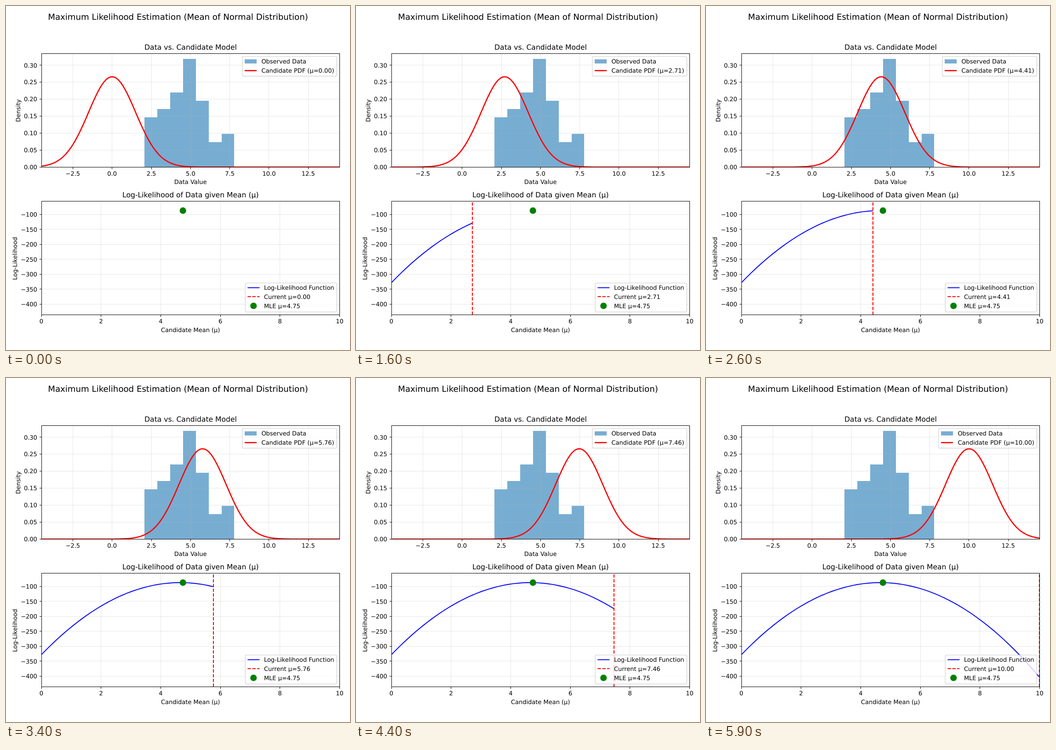
Recreate the animation shown at these times as an HTML page. Size 748 px wide and 748 px high, loop 6 s.

```html
<!DOCTYPE html>
<html lang="en">
<head>
<meta charset="utf-8">
<title>Maximum Likelihood Estimation</title>
<style>
  html, body { margin: 0; width: 100%; height: 100%; overflow: hidden; background: #fff; }
  svg { display: block; width: 100%; height: 100%; }
  text { font: 12.99px "DejaVu Sans", sans-serif; text-rendering: geometricPrecision; white-space: pre; }
  .mid { text-anchor: middle; }
  .end { text-anchor: end; }
  .title { font-size: 15.58px; }
  .head { font-size: 18.18px; }
  .bar { fill: #1f77b4; fill-opacity: .6; }
  .grid { stroke: #b0b0b0; stroke-opacity: .3; }
  .axis { stroke: #000; fill: none; }
  .pdf { stroke: #f00; stroke-width: 2.6; fill: none; stroke-linejoin: round; }
  .loglik { stroke: #00f; stroke-width: 1.95; fill: none; stroke-linejoin: round; }
  .current { stroke: #f00; stroke-width: 1.95; stroke-dasharray: 7.2 3.12; }
  .mle { fill: #008000; }
  .box { fill: #fff; fill-opacity: .8; stroke: #ccc; stroke-opacity: .8; stroke-width: 1.3; }
</style>
</head>
<body>
<svg id="stage" viewBox="0 0 748 748"></svg>
<script>
const STEPS = 60, STEP_MS = 100, SIGMA = 1.5, SAMPLES = 50;
const SAMPLE_MEAN = 4.658, PEAK = -87.2;
const LEFT = 77.5, RIGHT = 725.5;
const stage = document.getElementById('stage');

function add(tag, attrs, parent = stage) {
  const el = document.createElementNS('http://www.w3.org/2000/svg', tag);
  for (const key in attrs) el.setAttribute(key, attrs[key]);
  parent.appendChild(el);
  return el;
}
function label(str, x, y, cls = '', parent = stage) {
  const el = add('text', { x, y, class: cls }, parent);
  el.textContent = str;
  return el;
}
function line(x1, y1, x2, y2, cls, parent) {
  return add('line', { x1, y1, x2, y2, class: cls }, parent);
}
const minus = str => str.replace('-', '\u2212');
const snap = v => Math.floor(v) + .5;
const path = pts => 'M' + pts.map(p => p[0].toFixed(2) + ' ' + p[1].toFixed(2)).join('L');

const dataX = v => 77.1 + (v + 4.5) * 34.13;
const densY = v => 350.4 - v * 739;
const meanX = v => 77 + v * 64.84;
const likeY = v => 453.2 - (v + 100) * .65;
const meanAt = i => 10 * i / (STEPS - 1);
const logLik = m => PEAK - SAMPLES / (2 * SIGMA ** 2) * (m - SAMPLE_MEAN) ** 2;
const density = (x, m) => Math.exp(-(((x - m) / SIGMA) ** 2) / 2) / (SIGMA * Math.sqrt(2 * Math.PI));

// Grid, ticks and tick labels; returns a clipped layer for the curves.
function plot(id, top, bottom, xTicks, yTicks, mapX, mapY, digits) {
  const clip = add('clipPath', { id });
  add('rect', { x: 77, y: top, width: 649, height: bottom - top }, clip);
  for (const v of xTicks) {
    const x = snap(mapX(v));
    line(x, top, x, bottom, 'grid');
    line(x, bottom, x, bottom + 4.5, 'axis');
    label(minus(v.toFixed(digits[0])), mapX(v), bottom + 18.9, 'mid');
  }
  for (const v of yTicks) {
    const y = snap(mapY(v));
    line(LEFT, y, RIGHT, y, 'grid');
    line(LEFT - 4.5, y, LEFT, y, 'axis');
    label(minus(v.toFixed(digits[1])), 67.9, mapY(v) + 4.8, 'end');
  }
  const layer = add('g', { 'clip-path': `url(#${id})` });
  add('rect', { x: LEFT, y: top, width: RIGHT - LEFT, height: bottom - top, class: 'axis' });
  return layer;
}
const range = (n, from, step) => Array.from({ length: n }, (_, i) => from + i * step);
function sideLabel(str, x, y) {
  label(str, 0, 0, 'mid').setAttribute('transform', `translate(${x} ${y}) rotate(-90)`);
}

label('Maximum Likelihood Estimation (Mean of Normal Distribution)', 374, 29.8, 'mid head');

// Histogram and candidate density
const binLeft = 2.067, binWidth = .817;
[6, 7, 9, 13, 8, 3, 4].forEach((count, i) => {
  const x = Math.round(dataX(binLeft + i * binWidth));
  const next = Math.round(dataX(binLeft + (i + 1) * binWidth));
  const y = Math.round(densY(count / (SAMPLES * binWidth)));
  add('rect', { x, y, width: next - x, height: 350 - y, class: 'bar' });
});
const upper = plot('upper', 103.5, 350.5, range(7, -2.5, 2.5), range(7, 0, .05), dataX, densY, [1, 2]);
const pdf = add('path', { class: 'pdf' }, upper);
label('Data vs. Candidate Model', 401.5, 95.4, 'mid title');
label('Data Value', 401.2, 387.4, 'mid');
sideLabel('Density', 31, 227.5);

// Log-likelihood
const lower = plot('lower', 424.5, 671.5, range(6, 0, 2), range(7, -100, -50), meanX, likeY, [0, 0]);
const curve = add('path', { class: 'loglik' }, lower);
const current = line(0, 671.5, 0, 424.5, 'current', lower);
const best = meanAt(28);
add('circle', { cx: meanX(best), cy: likeY(logLik(best)), r: 7.1, class: 'mle' }, lower);
label('Log-Likelihood of Data given Mean (μ)', 401.3, 416.4, 'mid title');
label('Candidate Mean (μ)', 401.2, 708.6, 'mid');
sideLabel('Log-Likelihood', 24.4, 549);

// Legends
const upperBox = add('rect', { y: 109.7, height: 42.8, rx: 2.6, class: 'box' });
const upperKey = add('g', {});
add('rect', { x: 519, y: 116, width: 26, height: 9, class: 'bar' }, upperKey);
line(519, 140.5, 545, 140.5, 'pdf', upperKey);
label('Observed Data', 555.4, 125.4, '', upperKey);
const pdfText = label('', 555.4, 145.2, '', upperKey);

add('rect', { x: 520.2, y: 602.3, width: 199, height: 62.8, rx: 2.6, class: 'box' });
line(525.3, 612.5, 551.3, 612.5, 'loglik');
line(525.3, 632, 551.3, 632, 'current');
add('circle', { cx: 538.2, cy: 652, r: 7.1, class: 'mle' });
label('Log-Likelihood Function', 560.9, 617.3);
const currentText = label('', 560.9, 636.9);
label('MLE μ=' + best.toFixed(2), 560.9, 656.5);

function show(i) {
  const m = meanAt(i), shown = m.toFixed(2);
  const shift = shown.length > 4 ? -8 : 0;
  pdf.setAttribute('d', path(range(200, -4.5, 19 / 199).map(x => [dataX(x), densY(density(x, m))])));
  curve.setAttribute('d', path(range(i + 1, 0, 1).map(k => [meanX(meanAt(k)), likeY(logLik(meanAt(k)))])));
  const x = Math.round(meanX(m));
  current.setAttribute('x1', x);
  current.setAttribute('x2', x);
  pdfText.textContent = `Candidate PDF (μ=${shown})`;
  currentText.textContent = `Current μ=${shown}`;
  upperKey.setAttribute('transform', `translate(${shift} 0)`);
  upperBox.setAttribute('x', 513.8 + shift);
  upperBox.setAttribute('width', 205.4 - shift);
}

const start = performance.now();
let last = -1;
function tick() {
  const i = Math.floor((performance.now() - start) / STEP_MS) % STEPS;
  if (i !== last) show(last = i);
  requestAnimationFrame(tick);
}
tick();
</script>
</body>
</html>
```
